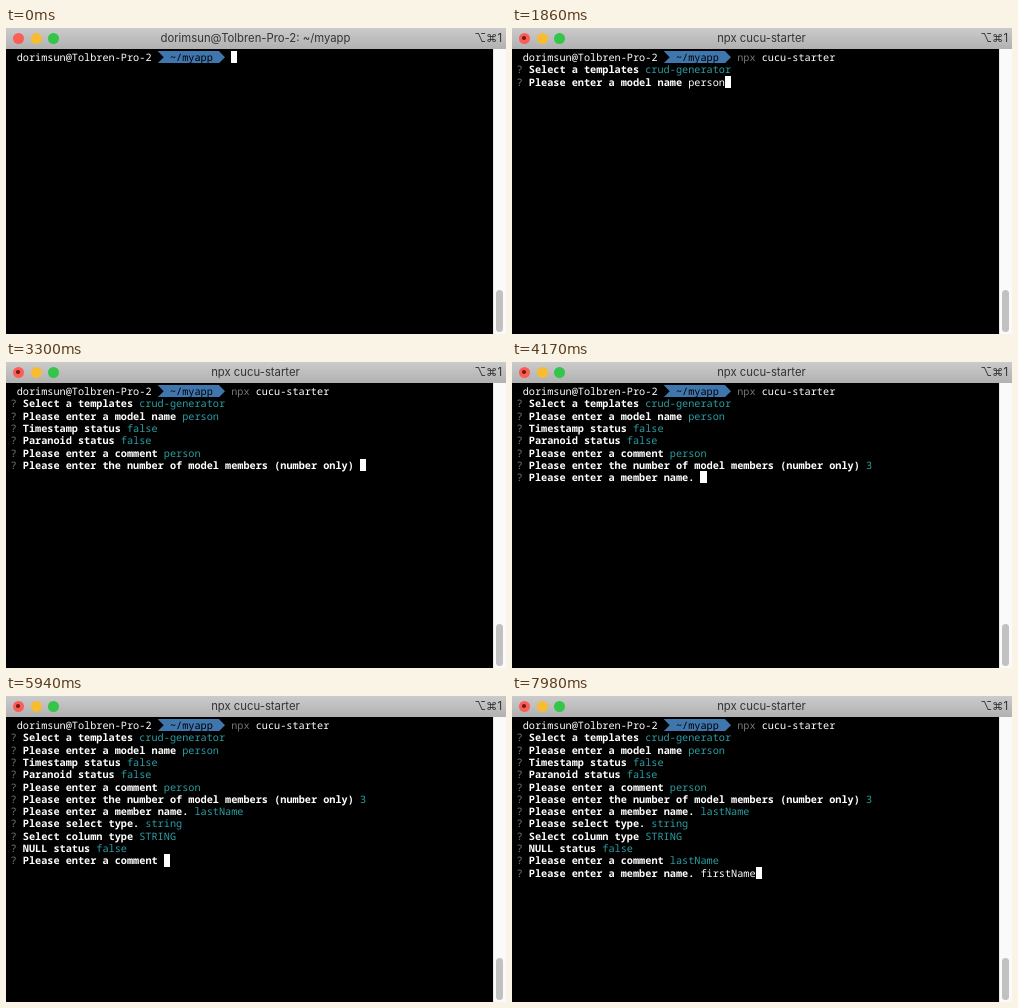
Animation of 500x306 px, one loop 8000 ms. Source, as an HTML page:

```html
<!DOCTYPE html>
<html lang="en">
<head>
<meta charset="utf-8">
<title>Terminal session</title>
<style>
  html, body { margin: 0; width: 100%; height: 100%; overflow: hidden; background: #000; }
  #stage { position: relative; width: 500px; height: 306px; overflow: hidden; background: #000; }
  #bar {
    position: absolute; inset: 0 0 auto; height: 20.5px;
    background: linear-gradient(#cbcbcb, #b1b1b1);
    font: 11.3px/21px Inter, "DejaVu Sans", sans-serif; color: #333;
    text-align: center; white-space: nowrap;
  }
  #title { position: absolute; left: 0; top: 0; width: 499px; }
  #keys { position: absolute; right: 4px; top: 0; }
  .light { position: absolute; top: 4.5px; width: 11px; height: 11px; border-radius: 50%; }
  #busy { position: absolute; left: 10.2px; top: 8.2px; width: 3.6px; height: 3.6px; border-radius: 50%; background: #7d1510; }
  #track { position: absolute; left: 487px; top: 20.5px; right: 0; bottom: 0; background: #fafafa; box-shadow: inset 1px 0 #e8e8e8; }
  #thumb { position: absolute; left: 490px; top: 262px; width: 7px; height: 42px; border-radius: 3.5px; background: #c1c1c1; }
  #screen span {
    position: absolute; height: 12.3px; white-space: pre; color: #fff;
    font: 10.22px/12.3px "Noto Sans Mono", "DejaVu Sans Mono", monospace;
    text-rendering: geometricPrecision;
  }
  #screen .bold { font-weight: 700; }
  #screen .medium { font-weight: 500; }
  #screen .dim { color: #777; }
  #screen .teal { color: #2b9ea3; }
  #screen .dark { color: #000; }
  #screen .cursor { width: 6.13px; background: #fff; }
  #screen .path {
    width: 67.4px; background: #4076ae;
    clip-path: polygon(0 0, 61.3px 0, 100% 50%, 61.3px 100%, 0 100%, 6.1px 50%);
  }
</style>
</head>
<body>
<div id="stage">
  <div id="bar">
    <i class="light" style="left:6.5px;background:#fb5d57"></i><i id="busy"></i>
    <i class="light" style="left:24.5px;background:#f8bc33"></i>
    <i class="light" style="left:41.5px;background:#34c54a"></i>
    <span id="title"></span><span id="keys">⌥⌘1</span>
  </div>
  <div id="screen"></div>
  <div id="track"></div>
  <div id="thumb"></div>
</div>
<script>
const LOOP = 8000, LEFT = 4.5, TOP = 23, CELL_W = 6.13, CELL_H = 12.3;
const HOST = 'dorimsun@Tolbren-Pro-2';
const COMMAND = 'npx cucu-starter';
const RUN_AT = 720;

// Typed answers use type: [first key, last key]; lists use items and an optional move time.
const prompts = [
  { q: 'Select a templates', answer: 'crud-generator', start: 1020, end: 1380, items: ['crud-generator'] },
  { q: 'Please enter a model name', answer: 'person', start: 1380, end: 1950, type: [1470, 1830] },
  { q: 'Timestamp status', answer: 'false', start: 1950, end: 2280, items: ['true', 'false'], move: 2130 },
  { q: 'Paranoid status', answer: 'false', start: 2280, end: 2820, items: ['true', 'false'], move: 2460 },
  { q: 'Please enter a comment', answer: 'person', start: 2820, end: 3240, type: [2880, 3150] },
  { q: 'Please enter the number of model members (number only)', answer: '3', start: 3240, end: 4170, type: [4140, 4140] },
  { q: 'Please enter a member name.', answer: 'lastName', start: 4170, end: 4950, type: [4260, 4830] },
  { q: 'Please select type.', answer: 'string', start: 4950, end: 5190, items: ['string', 'number', 'boolean', 'Date'] },
  { q: 'Select column type', answer: 'STRING', start: 5190, end: 5460, items: ['STRING', 'CHAR', 'TEXT', 'UUID', 'ENUM'] },
  { q: 'NULL status', answer: 'false', start: 5460, end: 5850, items: ['true', 'false'], move: 5640 },
  { q: 'Please enter a comment', answer: 'lastName', start: 5850, end: 6780, type: [5990, 6570] },
  { q: 'Please enter a member name.', answer: 'firstName', start: 6780, end: LOOP, type: [7110, 7950] }
];

const $ = id => document.getElementById(id);

function typed(text, [from, to], t) {
  if (t < from) return '';
  if (t >= to) return text;
  return text.slice(0, 1 + Math.floor((t - from) / (to - from) * (text.length - 1)));
}

function cellsAt(t) {
  const cells = [];
  const put = (row, col, text, style = '') => cells.push([row, col, text, style]);
  const cursor = (row, col) => put(row, col, '', 'cursor');

  put(0, 1, HOST);
  put(0, 24, '', 'path');
  put(0, 26, '~/myapp', 'dark');
  const command = typed(COMMAND, [30, 690], t);
  put(0, 36, command.slice(0, 3), 'dim');
  put(0, 40, command.slice(4), 'medium');
  if (t < RUN_AT) cursor(0, 36 + command.length);
  else if (t < prompts[0].start) cursor(1, 0);

  prompts.forEach((p, i) => {
    if (t < p.start) return;
    const row = i + 1, col = p.q.length + 3;
    put(row, 0, '?', 'dim');
    put(row, 2, p.q, 'bold');
    if (t >= p.end) {
      put(row, col, p.answer, 'teal');
    } else if (p.type) {
      const text = typed(p.answer, p.type, t);
      put(row, col, text, 'medium');
      cursor(row, col + text.length);
    } else {
      const moved = t >= (p.move ?? p.end);
      const active = moved ? p.items.indexOf(p.answer) : 0;
      if (!moved) put(row, col, '(Use arrow keys)', 'dim');
      p.items.forEach((item, k) => {
        if (k === active) put(row + 1 + k, 0, '❯', 'teal bold');
        put(row + 1 + k, 2, item, k === active ? 'teal' : 'medium');
      });
    }
  });
  return cells;
}

let shown = '';
function draw(t) {
  const cells = cellsAt(t), running = t >= RUN_AT;
  const key = running + JSON.stringify(cells);
  if (key === shown) return;
  shown = key;
  $('screen').replaceChildren(...cells.map(([row, col, text, style]) => {
    const span = document.createElement('span');
    span.className = style;
    span.textContent = text;
    span.style.left = LEFT + col * CELL_W + 'px';
    span.style.top = TOP + row * CELL_H + 'px';
    return span;
  }));
  $('title').textContent = running ? COMMAND : HOST + ': ~/myapp';
  $('busy').style.display = running ? '' : 'none';
}

const began = performance.now();
function tick() {
  draw((performance.now() - began) % LOOP);
  requestAnimationFrame(tick);
}
tick();
</script>
</body>
</html>
```
